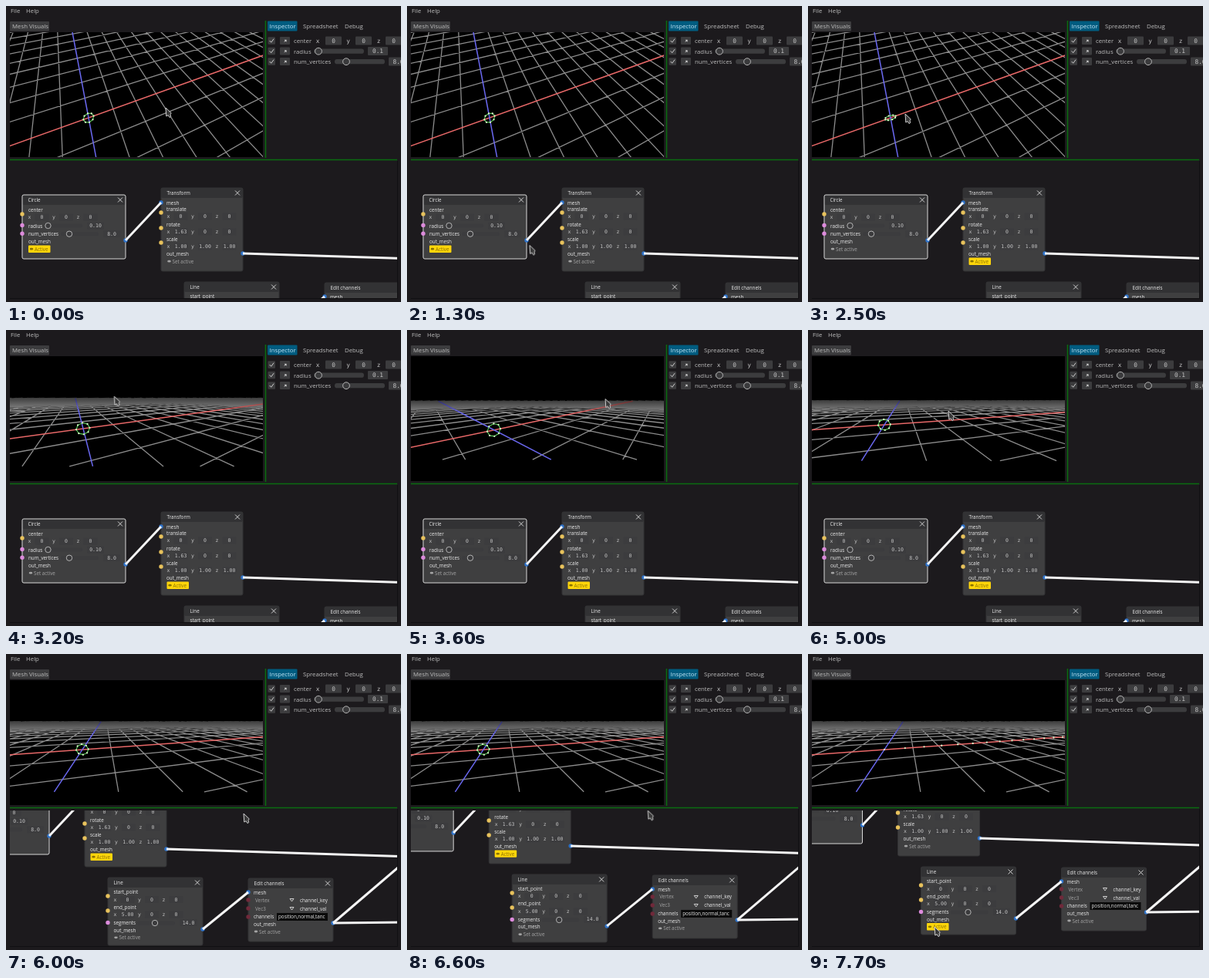
An HTML page with a canvas for the animation above (8000 ms loop, 512 px wide and 384 px high).

```html
<!DOCTYPE html>
<html lang="en">
<head>
<meta charset="utf-8">
<title>Node editor</title>
<style>
html, body { margin: 0; width: 100%; height: 100%; overflow: hidden; background: #1c1a1d; }
canvas { position: absolute; left: 5px; top: 34px; background: #000; }
svg { display: block; }
#ui { position: absolute; left: 0; top: 0; }
text { font: 7.8px "Open Sans", "Noto Sans", sans-serif; fill: #bdbdbd; dominant-baseline: central; }
.node text { font-size: 6.3px; fill: #ececec; }
text.num { font: 7.8px "DejaVu Sans Mono", monospace; fill: #c4c4c4; text-anchor: middle; }
.node text.num { font-size: 6.5px; fill: #c4c4c4; }
.node text.dim { fill: #a4a4a4; }
.node .on text { fill: #8a7200; }
.title { fill: #323234; }
.body { fill: #3f3f40; }
.box { fill: #3c3c3e; }
.wire { stroke: #f4f4f4; stroke-width: 3; }
.icon { fill: none; stroke: #cfcfcf; stroke-width: 1; }

.pan, .cursor, .state { animation: 8s linear infinite; }
.pan { animation-name: pan; }
.cursor { animation-name: cursor; }
.state { animation-timing-function: step-end; }
.circle { animation-name: circle; }
.transform { animation-name: transform; }
.line { animation-name: line; }
.edit { --on: 0; }
.on { opacity: var(--on); }
.off { opacity: calc(1 - var(--on)); }

@keyframes circle { 0% { --on: 1; } 23%, 100% { --on: 0; } }
@keyframes transform { 0% { --on: 0; } 23% { --on: 1; } 93.75%, 100% { --on: 0; } }
@keyframes line { 0% { --on: 0; } 93.75%, 100% { --on: 1; } }
@keyframes pan {
  0%, 70.5% { transform: translate(0, 0); }
  75%, 81.5% { transform: translate(-99px, -68px); }
  85%, 100% { transform: translate(-84.5px, -82px); }
}
@keyframes cursor {
  0%, 2.5% { transform: translate(207px, 132px); }
  10%, 11.5% { transform: translate(38px, 271px); }
  18.75%, 25% { transform: translate(222px, 331px); }
  31.25%, 32% { transform: translate(126px, 140px); }
  36.25% { transform: translate(131px, 92px); }
  40% { transform: translate(140px, 86px); }
  47.5% { transform: translate(315px, 91px); }
  51.25% { transform: translate(322px, 95px); }
  62.5% { transform: translate(182px, 105px); }
  65% { transform: translate(182px, 109px); }
  70%, 70.5% { transform: translate(407px, 275px); }
  75%, 81.5% { transform: translate(308px, 207px); }
  85% { transform: translate(322.5px, 194px); }
  92.5%, 100% { transform: translate(164px, 354px); }
}
</style>
</head>
<body>
<canvas id="view" width="328" height="162"></canvas>
<svg id="ui" width="512" height="384"></svg>
<script>
// ---------- interface ----------
const text = (x, y, s, cls = '') => `<text x="${x}" y="${y}" class="${cls}">${s}</text>`;
const num = (x, y, s) => text(x, y, s, 'num');
const rect = (x, y, w, h, cls, r = 1) =>
  `<rect x="${x}" y="${y}" width="${w}" height="${h}" rx="${r}" class="${cls}"/>`;
const field = (x, y, w, v, h = 11) => rect(x - w / 2, y - h / 2, w, h, 'box') + num(x, y, v);
const knob = (x, y, r) => `<circle cx="${x}" cy="${y}" r="${r}" fill="#3a3a3c" stroke="#b4b4b4"/>`;
const slider = (x, y, w, k, r) => rect(x, y - r * 0.7, w, r * 1.4, 'box', r * 0.7) + knob(k, y, r);
const wire = (x1, y1, x2, y2) => `<line class="wire" x1="${x1}" y1="${y1}" x2="${x2}" y2="${y2}"/>`;
const YELLOW = '#e8c25c', PINK = '#dd8bdc', BLUE = '#2f74cc', WINE = '#70293a';
const port = (x, y, color) => `<circle cx="${x}" cy="${y}" r="2.7" fill="${color}"/>`;

const nodeField = (x, y, w, v) => field(x, y, w, v, 9);
const nodeSlider = (x, y, k) => slider(x, y, 49, k, 3.7);
const vector = (x, y, values) => values.map((v, i) =>
  num(x + i * 31.5, y, 'xyz'[i]) + nodeField(x + 16 + i * 31.5, y, 18, v)).join('');

const eye = (x, y, color) =>
  `<ellipse cx="${x}" cy="${y}" rx="2.3" ry="1.4" fill="${color}"/>`;

const button = (x, y) => `
  <g class="off">${eye(x + 3, y, '#a4a4a4')}${text(x + 7, y, 'Set active', 'dim')}</g>
  <g class="on"><rect x="${x}" y="${y - 4.7}" width="28.5" height="9.4" rx="1" fill="#ffd60a"/>
    ${eye(x + 4, y, '#8a7200')}${text(x + 8, y, 'Active')}</g>`;

function node(name, title, x, y, w, h, content, border = '#333335') {
  const cx = x + w - 7, cy = y + 6.5;
  return `<g class="node state ${name}">
    ${rect(x, y, w, h, 'body', 2)}${rect(x, y, w, 13, 'title', 2)}
    <rect x="${x}" y="${y}" width="${w}" height="${h}" rx="2" fill="none" stroke="${border}"/>
    ${text(x + 7.5, cy, title)}
    <path class="icon" d="M${cx - 3} ${cy - 3}l6 6m0-6l-6 6"/>${content}</g>`;
}

const zero = [0, 0, 0];
const circleNode = node('circle', 'Circle', 21, 245, 134, 83,
  text(29, 264.7, 'center') + vector(30.5, 274.3, zero) +
  text(29, 285.2, 'radius') + nodeSlider(50, 285, 54.5) + nodeField(116, 285.2, 22, '0.10') +
  text(29, 295.8, 'num_vertices') + nodeSlider(71, 295.7, 82) + nodeField(137, 295.8, 22, '8.0') +
  text(29, 305.3, 'out_mesh') + button(29, 315.2) +
  port(21, 270, YELLOW) + port(21, 284.5, PINK) + port(21, 295.3, PINK) + port(155, 304, BLUE), '#d8d8d8');

const transformNode = node('transform', 'Transform', 201, 236, 106, 108,
  text(208, 255, 'mesh') + text(208, 263.7, 'translate') + vector(210.5, 273, zero) +
  text(208, 283.2, 'rotate') + vector(210.5, 293, ['1.63', 0, 0]) +
  text(208, 302.3, 'scale') + vector(210.5, 312, ['1.00', '1.00', '1.00']) +
  text(208, 321.3, 'out_mesh') + button(208.5, 331.2) +
  port(201, 255, BLUE) + [268, 288, 307].map(y => port(201, y, YELLOW)).join('') + port(307, 321, BLUE));

const lineNode = node('line', 'Line', 231, 358, 123, 88,
  text(238.5, 376.7, 'start_point') + vector(240.5, 386.5, zero) +
  text(238.5, 396, 'end_point') + vector(240.5, 406, ['5.00', 0, 0]) +
  text(238.5, 416.5, 'segments') + nodeSlider(269, 417, 292) + nodeField(335.5, 416.5, 22, '14.0') +
  text(238.5, 426, 'out_mesh') + button(238.5, 435.8) +
  port(231, 382, YELLOW) + port(231, 401, YELLOW) + port(231, 416.5, PINK) + port(354, 425, BLUE));

const combo = (y, value, label) => text(422, y, value, 'dim') +
  `<path class="icon" d="M467 ${y - 1.5}h5l-2.5 3.5z"/>` + text(480, y, label);

const editNode = node('edit', 'Edit channels', 413, 359, 110, 82,
  text(420, 377.5, 'mesh') + combo(387, 'Vertex', 'channel_key') + combo(398, 'Vec3', 'channel_val') +
  text(420, 408.5, 'channels') + '<rect x="450" y="404" width="66" height="10" fill="#0a0a0a"/>' +
  text(452, 408.7, 'position,normal,tanc') +
  text(420, 418.5, 'out_mesh') + button(420, 428) +
  port(413, 377, BLUE) + [387, 398, 409].map(y => port(413, y, WINE)).join('') + port(523, 417, BLUE));

const inspector = [45, 58.5, 72].map((y, i) =>
  rect(339.5, y - 4.7, 9.5, 9.4, 'box') + `<path class="icon" d="M341.7 ${y}l2 2.2l3.4-4.6"/>` +
  rect(355, y - 5, 13, 10, 'box') +
  `<path d="M360 ${y + 2}l1.7-2l-1-1.2h2.9v2.9l-1.1-1z" fill="#d0d0d0"/>` +
  text(373, y, ['center', 'radius', 'num_vertices'][i])).join('');

document.getElementById('ui').innerHTML =
  text(6, 6.4, 'File') + text(26, 6.4, 'Help') +
  rect(5, 20, 51, 12.5, 'box') + text(8, 25.8, 'Mesh Visuals') +
  '<rect x="339" y="19.5" width="38.5" height="13" rx="1" fill="#005c80"/>' +
  '<text x="341.5" y="25.8" style="fill:#c8e8f8">Inspector</text>' +
  text(385, 25.8, 'Spreadsheet') + text(439, 25.8, 'Debug') +
  inspector +
  [0, 1, 2].map(i => num(404 + i * 39.5, 45, 'xyz'[i]) + field(424.5 + i * 39, 45, 21, 0)).join('') +
  slider(399, 58.7, 65, 405, 4.4) + field(482, 58.5, 26, '0.1') +
  slider(426, 72.2, 65, 441, 4.4) + field(508.5, 72, 25, '8.0') +
  '<path d="M5 199.5H507M336.5 19V197" stroke="#0b6b10" stroke-width="1.6"/>' +
  `<svg x="5" y="203" width="502" height="176" viewBox="5 203 502 176"><g class="pan">
    ${circleNode + transformNode + lineNode + editNode}
    ${wire(155, 304, 201, 255) + wire(307, 321, 707, 333.5) + wire(354, 425, 413, 377)}
    ${wire(523, 417, 689, 275) + wire(523, 417, 706, 415)}
  </g></svg>
  <path d="M507.5 201V379.5H5" fill="none" stroke="#101012"/>
  <path class="cursor" d="M0 0L.8 11L3.2 9.6L5 12.6L6.7 11.5L6 8.8L7.2 6.8Z" fill="#3a3a3a" stroke="#cfcfcf"/>`;

// ---------- 3D view ----------
const LOOP = 8000, FOCAL = 146, NEAR = 0.358, FAR = 4.3;
const UNIT = 0.395;             // one world unit, in orbit distances
const CX = 164, CY = 81, REACH = 30;
const ctx = document.getElementById('view').getContext('2d');

// time, yaw, pitch (degrees), world centre on the stage
const poses = [
  [0, 67.2, 55.1, 107, 145],
  [2550, 67.2, 55.1, 107, 145],
  [2900, 64, 24, 101, 136],
  [3200, 61.6, 13.3, 100, 128],
  [4100, 27.5, 9.2, 129, 132],
  [5000, 73, 11.8, 99, 123],
  [5300, 75, 13.7, 99, 124],
  [LOOP, 75, 13.7, 99, 124]
];

function poseAt(t) {
  const i = poses.findIndex(p => p[0] > t), a = poses[i - 1], b = poses[i];
  const k = (t - a[0]) / (b[0] - a[0]);
  return a.map((v, j) => v + (b[j] - v) * k);
}

function makeCamera(t) {
  const [, yawDeg, pitchDeg, ox, oy] = poseAt(t);
  const yaw = yawDeg * Math.PI / 180, pitch = pitchDeg * Math.PI / 180;
  const sy = Math.sin(yaw), cy = Math.cos(yaw), sp = Math.sin(pitch), cp = Math.cos(pitch);
  const rise = FOCAL * sp / cp, dx = ox - 169, dy = oy - 115;
  const depth = rise / (dy + rise);
  const right0 = dx * depth / FOCAL, ahead0 = (depth - 1) / cp;
  return {
    rise,
    toEye([x, y, z]) {
      const right = right0 + UNIT * (x * sy - z * cy);
      const ahead = ahead0 + UNIT * (x * cy + z * sy), up = UNIT * y;
      return [right, -(ahead * sp + up * cp), 1 + ahead * cp - up * sp];
    }
  };
}

const project = ([x, y, z]) => [CX + FOCAL * x / z, CY + FOCAL * y / z];

function segment(cam, p, q) {
  const a = cam.toEye(p), b = cam.toEye(q), dz = b[2] - a[2];
  const n = (NEAR - a[2]) / dz, f = (FAR - a[2]) / dz;
  const t0 = Math.max(0, Math.min(n, f)), t1 = Math.min(1, Math.max(n, f));
  if (t0 >= t1) return;
  const at = t => project(a.map((v, i) => v + (b[i] - v) * t));
  ctx.moveTo(...at(t0));
  ctx.lineTo(...at(t1));
}

function strokeLines(cam, color, width, lines) {
  ctx.beginPath();
  lines.forEach(([p, q]) => segment(cam, p, q));
  ctx.strokeStyle = color;
  ctx.lineWidth = width;
  ctx.stroke();
}

const alongX = z => [[-REACH, 0, z], [REACH, 0, z]];
const alongZ = x => [[x, 0, -REACH], [x, 0, REACH]];
const grid = [];
for (let v = 0.5; v <= REACH; v += 0.5) grid.push(alongX(v), alongX(-v), alongZ(v), alongZ(-v));

const ring = tilt => Array.from({ length: 8 }, (_, i) => {
  const a = i * Math.PI / 4, s = 0.1 * Math.sin(a);
  return [0.1 * Math.cos(a), s * Math.sin(tilt), s * Math.cos(tilt)];
});
const flatRing = ring(0), turnedRing = ring(1.63);
const row = Array.from({ length: 15 }, (_, i) => [i * 5 / 14, 0, 0]);

function draw(t) {
  const cam = makeCamera(t);
  ctx.clearRect(0, 0, 328, 162);
  strokeLines(cam, '#8c8c8c', 1.3, grid);
  strokeLines(cam, '#e86868', 1.5, [alongX(0)]);
  strokeLines(cam, '#6a68f0', 1.5, [alongZ(0)]);

  const top = CY - cam.rise * (1 - 1 / FAR);
  const fog = ctx.createLinearGradient(0, top, 0, top + 16);
  fog.addColorStop(0, 'rgba(0,0,0,.55)');
  fog.addColorStop(1, 'rgba(0,0,0,0)');
  ctx.fillStyle = fog;
  ctx.fillRect(0, top - 2, 328, 18);

  const mesh = t < 1840 ? flatRing : t < 7500 ? turnedRing : row;
  if (mesh !== row) strokeLines(cam, '#58c858', 1.2, mesh.map((p, i) => [p, mesh[(i + 1) % 8]]));
  ctx.fillStyle = '#dcf5cc';
  for (const p of mesh) {
    const [x, y] = project(cam.toEye(p));
    ctx.beginPath();
    ctx.arc(x, y, 1.15, 0, 7);
    ctx.fill();
  }
}

let start;
function tick(now) {
  start ??= now;
  draw((now - start) % LOOP);
  requestAnimationFrame(tick);
}
requestAnimationFrame(tick);
</script>
</body>
</html>
```
